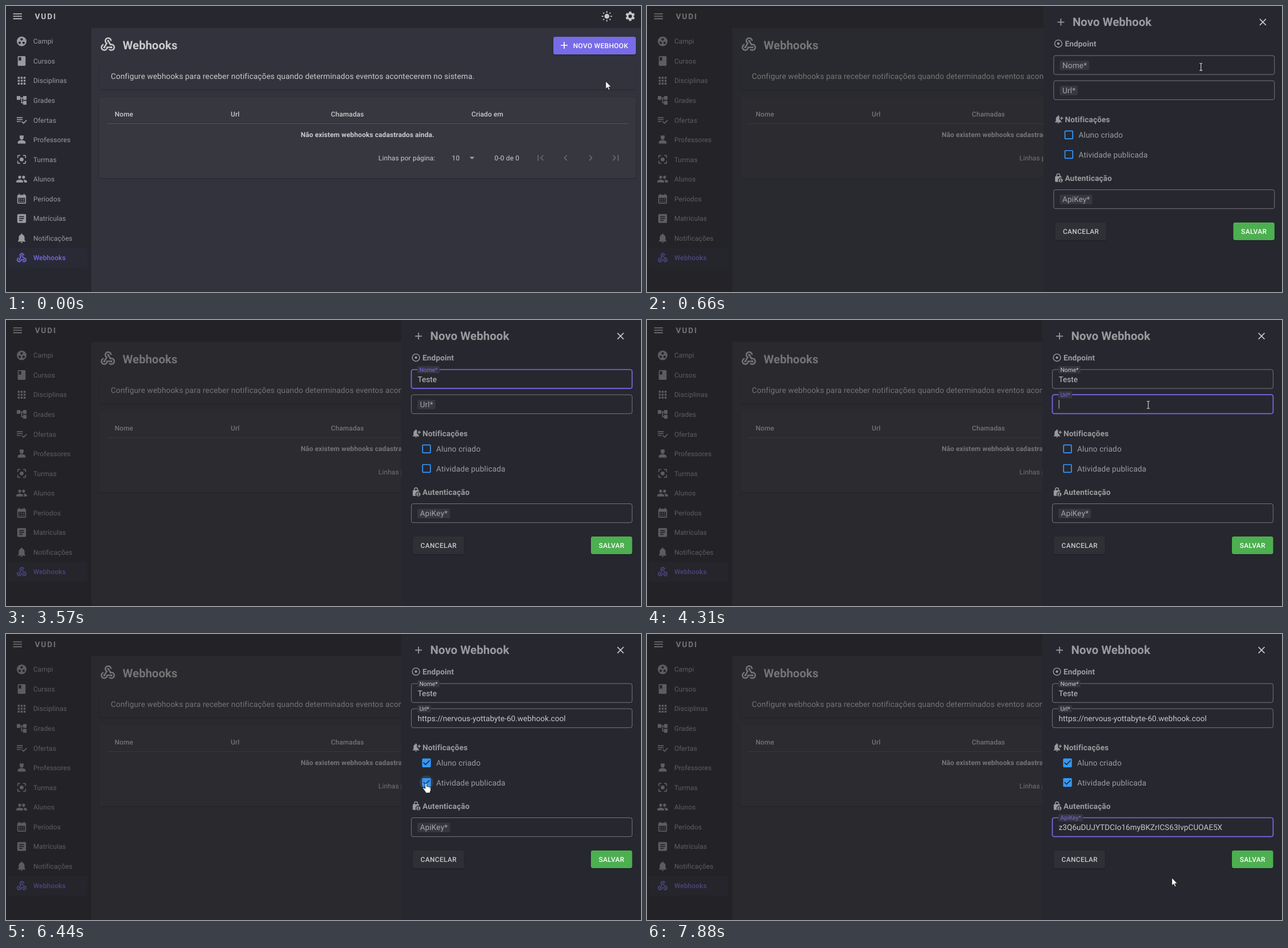
Write an HTML page that moves like this. It is 1116 px wide and 502 px high and loops after 8 s.

```html
<!DOCTYPE html>
<html lang="pt">
<head>
<meta charset="utf-8">
<style>
html, body { margin: 0; width: 100%; height: 100%; overflow: hidden; background: #32333d; }
svg { display: block; width: 1116px; height: 502px; }
text { font-family: Roboto, sans-serif; text-rendering: geometricPrecision; white-space: pre; }
.shade { filter: drop-shadow(0 1.5px 1.2px rgba(0,0,0,.25)); }
</style>
</head>
<body>
<svg id="stage" viewBox="0 0 1116 502"></svg>
<script>
const LOOP = 8000, SMALL = 11.95, BODY = 13.65, HEAD = 20.47, ICON = 20.5;
const PURPLE = '#776be7', BLUE = '#3299ff', DARK = '#27272f', SURFACE = '#373740';
const BRIGHT = 'rgba(255,255,255,.74)', DIM = 'rgba(255,255,255,.54)', FAINT = 'rgba(255,255,255,.25)';

const paths = {
  menu: 'M3 18h18v-2H3v2zm0-5h18v-2H3v2zm0-7v2h18V6H3z',
  gear: 'M19.14 12.94c.04-.3.06-.61.06-.94 0-.32-.02-.64-.07-.94l2.03-1.58c.18-.14.23-.41.12-.61l-1.92-3.32c-.12-.22-.37-.29-.59-.22l-2.39.96c-.5-.38-1.03-.7-1.62-.94l-.36-2.54c-.04-.24-.24-.41-.48-.41h-3.84c-.24 0-.43.17-.47.41l-.36 2.54c-.59.24-1.13.57-1.62.94l-2.39-.96c-.22-.08-.47 0-.59.22L2.74 8.87c-.12.21-.08.47.12.61l2.03 1.58c-.05.3-.09.63-.09.94s.02.64.07.94l-2.03 1.58c-.18.14-.23.41-.12.61l1.92 3.32c.12.22.37.29.59.22l2.39-.96c.5.38 1.03.7 1.62.94l.36 2.54c.05.24.24.41.48.41h3.84c.24 0 .44-.17.47-.41l.36-2.54c.59-.24 1.13-.56 1.62-.94l2.39.96c.22.08.47 0 .59-.22l1.92-3.32c.12-.22.07-.47-.12-.61zM12 15.6a3.6 3.6 0 110-7.2 3.6 3.6 0 010 7.2z',
  campus: 'M12 2a10 10 0 100 20 10 10 0 000-20zM8 17.5a2.5 2.5 0 110-5 2.5 2.5 0 010 5zM12 10.5a2.5 2.5 0 110-5 2.5 2.5 0 010 5zM16 17.5a2.5 2.5 0 110-5 2.5 2.5 0 010 5z',
  book: 'M18 2H6a2 2 0 00-2 2v16a2 2 0 002 2h12a2 2 0 002-2V4a2 2 0 00-2-2zM6 4h5v8l-2.5-1.5L6 12V4z',
  apps: [4, 10, 16].map(y => [4, 10, 16].map(x => `M${x} ${y}h4v4h-4z`).join('')).join(''),
  tree: 'M22 11V3h-7v3H9V3H2v8h7V8h2v10h4v3h7v-8h-7v3h-2V8h2v3z',
  list: 'M14 10H2v2h12v-2zm0-4H2v2h12V6zM2 16h8v-2H2v2zm19.5-4.5L23 13l-6.99 7-4.51-4.5L13 14l3.01 3 5.49-5.5z',
  person: 'M18.39 14.56C16.71 13.7 14.53 13 12 13s-4.71.7-6.39 1.56C4.61 15.07 4 16.1 4 17.22V20h16v-2.78c0-1.12-.61-2.15-1.61-2.66zM12 12c2.21 0 4-1.79 4-4V4.5c0-.83-.67-1.5-1.5-1.5-.52 0-.98.27-1.25.67-.27-.4-.73-.67-1.25-.67s-.98.27-1.25.67c-.27-.4-.73-.67-1.25-.67C8.67 3 8 3.67 8 4.5V8c0 2.21 1.79 4 4 4z',
  focus: 'M12 8a4 4 0 100 8 4 4 0 000-8zm-7 7H3v4a2 2 0 002 2h4v-2H5v-4zM5 5h4V3H5a2 2 0 00-2 2v4h2V5zm14-2h-4v2h4v4h2V5a2 2 0 00-2-2zm0 16h-4v2h4a2 2 0 002-2v-4h-2v4z',
  people: 'M16 11a3 3 0 100-6 3 3 0 000 6zM8 11a3 3 0 100-6 3 3 0 000 6zm0 2c-2.33 0-7 1.17-7 3.5V19h14v-2.5c0-2.33-4.67-3.5-7-3.5zm8 0c-.29 0-.62.02-.97.05 1.16.84 1.97 1.97 1.97 3.45V19h6v-2.5c0-2.33-4.67-3.5-7-3.5z',
  calendar: 'M19 4h-1V2h-2v2H8V2H6v2H5a2 2 0 00-2 2v14a2 2 0 002 2h14a2 2 0 002-2V6a2 2 0 00-2-2zm0 16H5V10h14v10zM9 14H7v-2h2v2zm4 0h-2v-2h2v2zm4 0h-2v-2h2v2zm-8 4H7v-2h2v2zm4 0h-2v-2h2v2zm4 0h-2v-2h2v2z',
  article: 'M19 3H5a2 2 0 00-2 2v14a2 2 0 002 2h14a2 2 0 002-2V5a2 2 0 00-2-2zm-5 14H7v-2h7v2zm3-4H7v-2h10v2zm0-4H7V7h10v2z',
  bell: 'M12 22a2 2 0 002-2h-4a2 2 0 002 2zm6-6v-5c0-3.07-1.64-5.64-4.5-6.32V4a1.5 1.5 0 00-3 0v.68C7.63 5.36 6 7.92 6 11v5l-2 2v1h16v-1l-2-2z',
  hook: 'M10 15h5.88c.27-.31.67-.5 1.12-.5.83 0 1.5.67 1.5 1.5s-.67 1.5-1.5 1.5c-.44 0-.84-.19-1.12-.5H11.9c-.46 2.28-2.48 4-4.9 4-2.76 0-5-2.24-5-5 0-2.42 1.72-4.44 4-4.9v2.07c-1.16.41-2 1.53-2 2.83 0 1.65 1.35 3 3 3s3-1.35 3-3v-1zm2.5-11c1.65 0 3 1.35 3 3h2c0-2.76-2.24-5-5-5s-5 2.24-5 5c0 1.43.6 2.71 1.55 3.62l-2.35 3.9c-.68.14-1.2.75-1.2 1.48 0 .83.67 1.5 1.5 1.5s1.5-.67 1.5-1.5c0-.16-.02-.31-.07-.45l3.38-5.63C10.49 9.61 9.5 8.42 9.5 7c0-1.65 1.35-3 3-3zm4.5 9c-.64 0-1.23.2-1.72.54l-3.05-5.07C11.53 8.35 11 7.74 11 7c0-.83.67-1.5 1.5-1.5S14 6.17 14 7c0 .15-.02.29-.06.43l2.19 3.65c.28-.05.57-.08.87-.08 2.76 0 5 2.24 5 5s-2.24 5-5 5c-1.85 0-3.47-1.01-4.33-2.5h2.67c.48.32 1.05.5 1.66.5 1.65 0 3-1.35 3-3s-1.35-3-3-3z',
  add: 'M19 13h-6v6h-2v-6H5v-2h6V5h2v6h6v2z',
  close: 'M19 6.41L17.59 5 12 10.59 6.41 5 5 6.41 10.59 12 5 17.59 6.41 19 12 13.41 17.59 19 19 17.59 13.41 12z',
  target: 'M12 2a10 10 0 100 20 10 10 0 000-20zm0 18a8 8 0 110-16 8 8 0 010 16zm0-11a3 3 0 100 6 3 3 0 000-6z',
  bellAdd: 'M10 20h4a2 2 0 01-4 0zm4-11c0 2.61 1.67 4.83 4 5.66V17h2v2H4v-2h2v-7c0-2.79 1.91-5.14 4.5-5.8v-.7a1.5 1.5 0 013 0v.7c.71.18 1.36.49 1.95.9C14.54 6.14 14 7.51 14 9zm10-1h-3V5h-2v3h-3v2h3v3h2v-3h3V8z',
  lock: 'M18 8h-1V6A5 5 0 007 6v2H6a2 2 0 00-2 2v10a2 2 0 002 2h6.3A7 7 0 0120 11.3V10a2 2 0 00-2-2zM9 8V6a3 3 0 016 0v2zM18 13a5 5 0 100 10 5 5 0 000-10zm0 2a1.5 1.5 0 110 3 1.5 1.5 0 010-3zm0 6.5a3 3 0 01-2.5-1.5c.1-.8 1.7-1.2 2.5-1.2s2.4.4 2.5 1.2a3 3 0 01-2.5 1.5z',
  box: 'M19 5v14H5V5h14m0-2H5a2 2 0 00-2 2v14a2 2 0 002 2h14a2 2 0 002-2V5a2 2 0 00-2-2z',
  boxChecked: 'M19 3H5a2 2 0 00-2 2v14a2 2 0 002 2h14a2 2 0 002-2V5a2 2 0 00-2-2zm-9 14l-5-5 1.41-1.41L10 14.17l7.59-7.59L19 8l-9 9z',
  down: 'M7 10l5 5 5-5z',
  prev: 'M15.41 7.41L14 6l-6 6 6 6 1.41-1.41L10.83 12z',
  next: 'M10 6L8.59 7.41 13.17 12l-4.58 4.59L10 18l6-6z',
  first: 'M18.41 16.59L13.82 12l4.59-4.59L17 6l-6 6 6 6zM6 6h2v12H6z',
  last: 'M5.59 7.41L10.18 12l-4.59 4.59L7 18l6-6-6-6zM16 6h2v12h-2z'
};

const text = (x, y, str, size = BODY, fill = DIM, extra = '', spacing = size === SMALL ? .0107 : .0094) =>
  `<text x="${x}" y="${y}" font-size="${size}" fill="${fill}" letter-spacing="${spacing}em" ${extra}>${str}</text>`;
const rect = (x, y, w, h, fill, extra = '') =>
  `<rect x="${x}" y="${y}" width="${w}" height="${h}" fill="${fill}" ${extra}/>`;
const icon = (name, cx, cy, size = ICON, fill = DIM, extra = '') =>
  `<path d="${paths[name]}" fill="${fill}" fill-rule="evenodd" transform="translate(${cx - size / 2} ${cy - size / 2}) scale(${size / 24})" ${extra}/>`;
const BOLD = 'font-weight="600"', MEDIUM = 'font-weight="500"', MID = MEDIUM + ' text-anchor="middle"';
const ROUND = 'rx="3.4"', CARD = 'rx="3.4" class="shade"';

const nav = [['Campi', 'campus'], ['Cursos', 'book'], ['Disciplinas', 'apps'], ['Grades', 'tree'],
  ['Ofertas', 'list'], ['Professores', 'person'], ['Turmas', 'focus'], ['Alunos', 'people'],
  ['Períodos', 'calendar'], ['Matrículas', 'article'], ['Notificações', 'bell'], ['Webhooks', 'hook']];

const navItem = ([label, glyph], i) => {
  const y = 62 + i * 34.55, active = i === nav.length - 1, fill = active ? PURPLE : DIM;
  return icon(glyph, 27.5, y, ICON, fill) + text(47.9, y + 4.3, label, SMALL, fill, active ? MEDIUM : '');
};

const page =
  rect(0, 0, 1116, 502, DARK) + rect(150, 38.5, 966, 464, '#32333d') +
  icon('menu', 20.3, 18, ICON, BRIGHT) +
  text(50.7, 23, 'VUDI', BODY, BRIGHT, 'font-weight="700"', .14) +
  `<g transform="translate(1045.8 7.8) scale(.854)" fill="${BRIGHT}"><circle cx="12" cy="12" r="5"/>
   <path d="M2 12h2M20 12h2M12 2v2M12 20v2M5 5l1 1M18 18l1 1M5 19l1-1M18 6l1-1" stroke="${BRIGHT}" stroke-width="2" stroke-linecap="round"/></g>` +
  icon('gear', 1097, 18, ICON, BRIGHT) +
  rect(3, 425, 140, 34.5, 'rgba(119,107,231,.045)', ROUND) + nav.map(navItem).join('') +
  icon('hook', 179, 67.5, 30, BRIGHT) + text(205, 76, 'Webhooks', HEAD, BRIGHT, BOLD, 0) +
  rect(962, 54, 145, 31, PURPLE, CARD + ' id="newButton"') + icon('add', 981, 69, ICON, '#fff') +
  text(996.7, 73.5, 'NOVO WEBHOOK', SMALL, '#fff', MEDIUM, .0286) +
  rect(164, 100, 943, 46.5, '#32333d', CARD) +
  text(184.3, 128, 'Configure webhooks para receber notificações quando determinados eventos acontecerem no sistema.', BODY, BRIGHT) +
  rect(164, 160, 943, 142, SURFACE, CARD) +
  [[191, 'Nome'], [395, 'Url'], [571, 'Chamadas'], [818, 'Criado em']]
    .map(([x, s]) => text(x, 193.7, s, SMALL, BRIGHT, MEDIUM)).join('') +
  rect(178, 206, 916, .9, 'rgba(255,255,255,.16)') +
  text(635.3, 229.6, 'Não existem webhooks cadastrados ainda.', SMALL, BRIGHT, BOLD + ' text-anchor="middle"') +
  text(654.6, 270.6, 'Linhas por página:', SMALL, BRIGHT) + text(783.6, 270.6, '10', SMALL, BRIGHT) +
  icon('down', 819, 266.5, ICON, DIM) + text(858.6, 270.6, '0-0 de 0', SMALL, BRIGHT) +
  ['first', 'prev', 'next', 'last'].map((n, i) => icon(n, 939.5 + i * 44, 266.5, ICON, FAINT)).join('');

const fields = [
  { label: 'Nome*', y: 87, focus: 1190, blur: 4090, caret: [1200, 1820, 2070, 3570],
    typed: [[2070, 'T'], [2650, 'Te'], [2820, 'Tes'], [2900, 'Test'], [3070, 'Teste']] },
  { label: 'Url*', y: 131.2, focus: 4090, blur: 5500, caret: [4110, 5140],
    typed: [[4640, 'https://nervous-yottabyte-60.webhook.cool']] },
  { label: 'ApiKey*', y: 322.5, focus: 6800, blur: LOOP, caret: [6820, 7550],
    typed: [[7050, 'z3Q6uDUJYTDCIo16myBKZrICS63IvpCUOAE5X']] }
];
const checks = [
  { label: 'Aluno criado', y: 226.2, at: 5500 },
  { label: 'Atividade publicada', y: 260.6, at: 6230 }
];

const fieldMarkup = ({ label, y }) => `<g class="field">` +
  rect(712.4, y, 388, 33.2, 'none', 'rx="3.4" class="border"') +
  `<g class="label">${rect(0, 0, 0, 16.8, SURFACE, 'rx="2"')}${text(4.6, 13.2, label)}</g>` +
  text(723.6, y + 21.6, '', BODY, BRIGHT, 'class="value"', 0) +
  rect(0, y + 9, 1, 15.4, 'rgba(255,255,255,.75)', 'class="caret"') + '</g>';
const checkMarkup = ({ label, y }) => `<g class="check">
  <circle cx="739" cy="${y}" r="12.3" fill="rgba(255,255,255,.09)"/>` +
  icon('box', 739, y, ICON, BLUE) + icon('boxChecked', 739, y, ICON, BLUE) + text(756.1, y + 4.9, label) + '</g>';
const section = (glyph, y, label) => icon(glyph, 720.5, y, 17.1, DIM) + text(732, y + 5, label, BODY, DIM, BOLD);

const drawer = rect(694.5, 0, 422, 502, DARK) +
  icon('add', 725, 28.3, ICON, DIM) + text(745.5, 35.3, 'Novo Webhook', HEAD, DIM, BOLD, .002) +
  icon('close', 1080, 28.3, ICON, BRIGHT) +
  section('target', 66, 'Endpoint') + section('bellAdd', 199.2, 'Notificações') + section('lock', 301.7, 'Autenticação') +
  fields.map(fieldMarkup).join('') + checks.map(checkMarkup).join('') +
  rect(715, 380, 90, 31, '#2f2f36', CARD) + text(760.3, 399.6, 'CANCELAR', SMALL, BRIGHT, MID, .0286) +
  rect(1028, 380, 72.5, 31, '#4caf50', CARD) + text(1064.3, 399.6, 'SALVAR', SMALL, '#fff', MID, .0286);

const cursors = `<g id="cursor" stroke-linejoin="round">
  <path class="arrow" d="M0 0V13.6l3.1-2.9 2.2 4.7 2-.9-2.1-4.6h4.3z" fill="#fff" stroke="#111" stroke-width=".7"/>
  <path class="beam" d="M-2.5-6.2h1.7q.8 0 .8.8 0-.8.8-.8h1.7M0-5.5v11M-2.5 6.2h1.7q.8 0 .8-.8 0 .8.8.8h1.7" fill="none" stroke="#ddd" stroke-width="1.1"/>
  <path class="hand" d="M-1.4 1.2Q-1.4 0 0 0t1.4 1.2v4.4q2-.8 2.6.6 1.8-.6 2.4.7 2-.4 2.2 1.3v3.4q0 2-1.4 3.4v2H-.6v-1.6l-4.4-6q-.6-1.6.8-1.8 1 0 2.8 2z" fill="#fff" stroke="#111" stroke-width=".8"/></g>`;

const stage = document.getElementById('stage');
stage.innerHTML = page + rect(0, 0, 1116, 502, '#212121', 'id="veil"') + `<g id="drawer">${drawer}</g>` + cursors;

const $ = id => document.getElementById(id);
const set = (el, attrs) => { for (const k in attrs) el.setAttribute(k, attrs[k]); };
const show = (el, on) => el.setAttribute('visibility', on ? 'visible' : 'hidden');
const fieldEls = [...stage.querySelectorAll('.field')];
const checkEls = [...stage.querySelectorAll('.check')];

// time, x, y, pointer shape from that time on
const track = [
  [0, 1054, 132, 'arrow'], [40, 1054, 132, 'arrow'], [250, 1036, 84, 'hand'], [340, 1030, 74, 'hand'],
  [470, 1030, 74, 'hand'], [540, 1015, 82, 'arrow'], [620, 990, 104, 'beam'], [660, 974, 107, 'beam'],
  [820, 905, 97, 'beam'], [1020, 889, 103, 'beam'], [2070, 889, 103, ''], [3610, 889, 103, 'beam'],
  [3780, 884, 125, 'arrow'], [3830, 882, 135, 'beam'], [3950, 881, 149, 'beam'], [4640, 881, 149, ''],
  [5060, 881, 149, 'beam'], [5180, 850, 165, 'arrow'], [5400, 742, 222, 'hand'], [5480, 738, 228, 'hand'],
  [5740, 738, 228, 'hand'], [5830, 738, 246, 'hand'], [6010, 738, 262, 'hand'], [6480, 738, 262, 'hand'],
  [6540, 760, 275, 'arrow'], [6700, 880, 324, 'beam'], [6800, 902, 340, 'beam'], [7050, 902, 336, ''],
  [7470, 902, 336, 'beam'], [7600, 908, 358, 'arrow'], [7880, 922.5, 428, 'arrow'], [LOOP, 922.5, 428, 'arrow']
];

// cubic-bezier(0, 0, .2, 1)
function ease(p) {
  if (p <= 0 || p >= 1) return p <= 0 ? 0 : 1;
  let lo = 0, hi = 1;
  for (let i = 0; i < 20; i++) {
    const m = (lo + hi) / 2;
    if (.6 * (1 - m) * m * m + m ** 3 < p) lo = m; else hi = m;
  }
  return 3 * (1 - lo) * lo * lo + lo ** 3;
}

function drawField(f, el, t) {
  const focused = t >= f.focus && t < f.blur;
  const value = f.typed.reduce((s, [at, v]) => t >= at ? v : s, '');
  const [border, label, input, caret] = ['.border', '.label', '.value', '.caret'].map(s => el.querySelector(s));
  const [back, name] = label.children;
  const p = ease((t - f.focus) / 200);
  set(border, { stroke: focused ? PURPLE : 'rgba(255,255,255,.38)', 'stroke-width': focused ? 1.7 : .95 });
  set(label, { transform: `translate(723 ${f.y + 8.8 - 15 * p}) scale(${1 - .25 * p})` });
  set(back, { width: name.getComputedTextLength() + 8.6 });
  set(name, { fill: focused ? PURPLE : value ? BRIGHT : DIM });
  input.textContent = value;
  set(caret, { x: 723.6 + (value ? input.getComputedTextLength() : 0) });
  const [a, b, c, d] = f.caret;
  show(caret, t >= a && t < b || t >= c && t < d);
}

function draw(t) {
  const open = ease((t - 459) / 225);
  set($('veil'), { opacity: open / 2 });
  set($('drawer'), { transform: `translate(${422 * (1 - open)} 0)` });
  set($('newButton'), { fill: t >= 250 && t < 540 ? '#5a4ce2' : PURPLE });

  const i = track.findIndex((k, n) => n === track.length - 2 || t < track[n + 1][0]);
  const [t0, x0, y0, shape] = track[i], [t1, x1, y1] = track[i + 1];
  const p = (t - t0) / (t1 - t0), x = x0 + (x1 - x0) * p, y = y0 + (y1 - y0) * p;
  set($('cursor'), { transform: `translate(${x} ${y})` });
  for (const c of $('cursor').children) show(c, c.getAttribute('class') === shape);

  fields.forEach((f, n) => drawField(f, fieldEls[n], t));
  checks.forEach((c, n) => {
    const [halo, empty, full] = checkEls[n].children;
    show(halo, shape === 'hand' && Math.hypot(x - 739, y - c.y) < 13);
    show(empty, t < c.at);
    show(full, t >= c.at);
  });
}

function tick() {
  draw(performance.now() % LOOP);
  requestAnimationFrame(tick);
}
tick();
</script>
</body>
</html>
```
